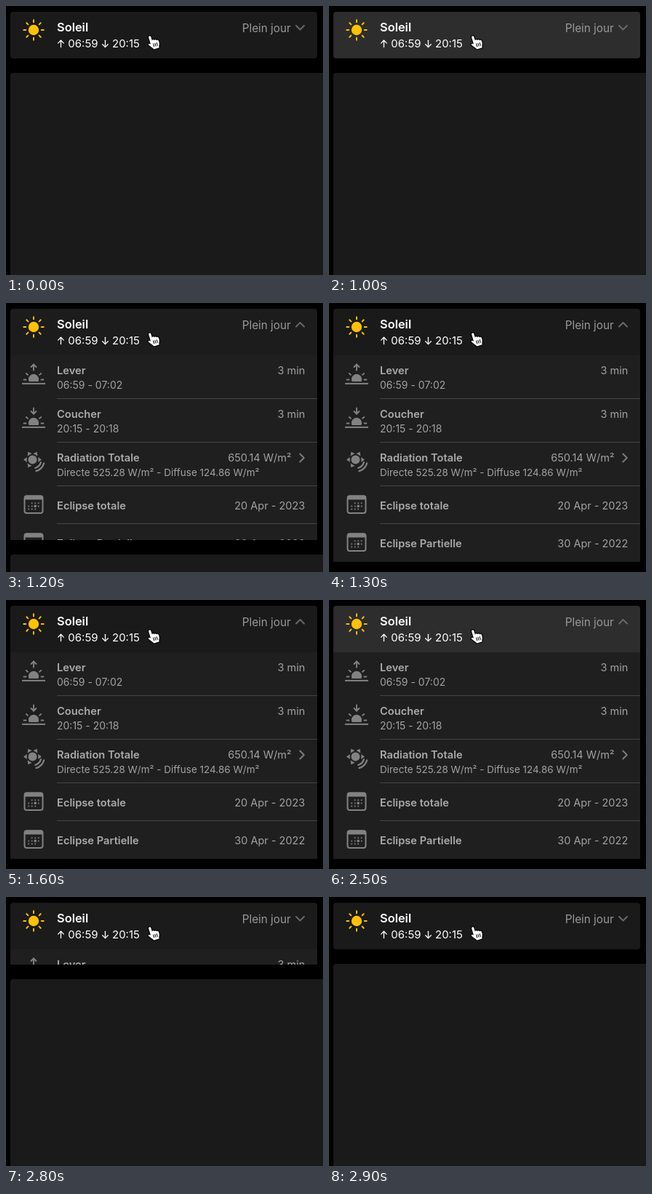
These frames come from a looping animation (436x370 px, 4000 ms). An HTML page with a canvas:

```html
<!DOCTYPE html>
<html lang="fr">
<head>
<meta charset="utf-8">
<style>
html, body { margin: 0; width: 100%; height: 100%; overflow: hidden; background: #000; }
canvas { display: block; width: 436px; height: 370px; }
</style>
</head>
<body>
<canvas id="stage"></canvas>
<script>
const W = 436, H = 370, LOOP = 4000, STEP = 100;
const HEAD = 72, OPEN = 284, GRAY = '#828284', YELLOW = '#ffc107';
const canvas = document.getElementById('stage');
const dpr = window.devicePixelRatio || 1;
canvas.width = W * dpr;
canvas.height = H * dpr;
const c = canvas.getContext('2d');

function text(s, x, y, size, weight, color, align = 'left') {
  c.font = `${weight} ${size}px Inter, "Liberation Sans", sans-serif`;
  c.textAlign = align;
  c.fillStyle = color;
  c.fillText(s, x, y);
}

function line(points, color, width, cap = 'round') {
  c.beginPath();
  points.forEach(([x, y], i) => i ? c.lineTo(x, y) : c.moveTo(x, y));
  c.strokeStyle = color;
  c.lineWidth = width;
  c.lineCap = cap;
  c.lineJoin = 'round';
  c.stroke();
}

function disc(x, y, r, color) {
  c.beginPath();
  c.arc(x, y, r, 0, Math.PI * 2);
  c.fillStyle = color;
  c.fill();
}

function box(x, y, w, h, radii, color) {
  c.beginPath();
  c.roundRect(x, y, w, h, radii);
  c.fillStyle = color;
  c.fill();
}

function ray(x, y, angle, from, to, color, width) {
  const dx = Math.cos(angle), dy = Math.sin(angle);
  line([[x + dx * from, y + dy * from], [x + dx * to, y + dy * to]], color, width);
}

function arrow(x, top, bottom, up, head, color, width) {
  const tip = up ? top : bottom, dy = up ? head : -head;
  line([[x, top], [x, bottom]], color, width);
  line([[x - head, tip + dy], [x, tip], [x + head, tip + dy]], color, width);
}

function sun(x, y) {
  disc(x, y, 7.2, YELLOW);
  for (let i = 0; i < 8; i++) ray(x, y, i * Math.PI / 4, 10.8, 13.7, YELLOW, 2);
}

function horizon(y, up) {
  arrow(38, y, y + 8, up, 3.5, GRAY, 1.9);
  c.beginPath();
  c.arc(38, y + 20.5, 7.2, Math.PI * 0.86, Math.PI * 2.14);
  c.fillStyle = GRAY;
  c.fill();
  for (const a of [-180, -140, -40, 0]) {
    ray(38, y + 21, a * Math.PI / 180, 10.5, 13.4, GRAY, 1.9);
  }
  line([[22, y + 26.4], [54, y + 26.4]], GRAY, 2, 'butt');
}

function radiation(x, y) {
  disc(x, y, 6, GRAY);
  for (const a of [0, 120, 180, 240, 300]) {
    c.save();
    c.translate(x, y);
    c.rotate(a * Math.PI / 180);
    c.beginPath();
    c.moveTo(7.8, -3.4);
    c.lineTo(12.4, 0);
    c.lineTo(7.8, 3.4);
    c.fillStyle = GRAY;
    c.fill();
    c.restore();
  }
  for (const r of [11.4, 15.8]) {
    c.beginPath();
    c.arc(x + 0.5, y + 0.5, r, 0.28, 1.29);
    c.strokeStyle = GRAY;
    c.lineWidth = 2.2;
    c.lineCap = 'round';
    c.stroke();
  }
}

function calendar(y) {
  c.beginPath();
  c.roundRect(25.5, y + 1, 25, 23.5, 3);
  c.strokeStyle = GRAY;
  c.lineWidth = 2;
  c.stroke();
  box(25, y, 26, 6, [3, 3, 0, 0], GRAY);
  for (let row = 0; row < 3; row++) {
    for (let col = 0; col < 4; col++) {
      if (row === 0 && col === 0 || row === 2 && col === 3) continue;
      disc(31.2 + col * 4.5, y + 10.7 + row * 4.2, row === 1 && col === 2 ? 1.8 : 1, GRAY);
    }
  }
}

function row(title, value, y, right = 411.3) {
  text(title, 70, y, 14.7, 600, '#aaaaaa');
  text(value, right, y, 14.5, 400, '#a2a2a2', 'right');
}

function note(s, y, size = 14) {
  text(s, 70, y, size, 400, '#a2a2a2');
}

function details(bottom) {
  c.save();
  c.beginPath();
  c.rect(6, HEAD, 422, bottom - HEAD);
  c.clip();
  box(6, HEAD, 422, OPEN, 0, '#1f1f1f');
  for (const y of [131, 191, 251, 303]) box(70, y, 358, 1, 0, '#454545');
  horizon(84.5, true);
  row('Lever', '3 min', 98);
  note('06:59 - 07:02', 118);
  horizon(144.5, false);
  row('Coucher', '3 min', 158);
  note('20:15 - 20:18', 178);
  radiation(36.5, 215.5);
  row('Radiation Totale', '650.14 W/m²', 218, 392.4);
  note('Directe 525.28 W/m² - Diffuse 124.86 W/m²', 238, 13.5);
  line([[404.3, 207.5], [409.8, 213], [404.3, 218.5]], '#7a7a7a', 2);
  calendar(264.5);
  row('Eclipse totale', '20 Apr - 2023', 284);
  calendar(316.5);
  row('Eclipse Partielle', '30 Apr - 2022', 336);
  c.restore();
}

function header(shade, expanded, closed) {
  const low = closed ? 4 : 0;
  box(6, 8, 422, 64, [4, 4, low, low], `rgb(${shade},${shade},${shade})`);
  sun(38, 33);
  text('Soleil', 70, 35, 16.4, 600, '#fff');
  arrow(75.5, 47.3, 56.6, true, 3.8, '#fff', 1.3);
  text('06:59', 85.3, 57, 15, 400, '#fff');
  arrow(136.5, 47.3, 56.6, false, 3.8, '#fff', 1.3);
  text('20:15', 146, 57, 15, 400, '#fff');
  text('Plein jour', 391.8, 36, 15.3, 400, '#999999', 'right');
  const [end, mid] = expanded ? [32.5, 27] : [27, 32.5];
  line([[399, end], [404.5, mid], [410, end]], '#686868', 2);
}

function hand() {
  c.save();
  c.translate(197.3, 41.5);
  c.rotate(-0.3);
  c.beginPath();
  c.moveTo(-1.6, 1.4);
  c.bezierCurveTo(-1.6, -0.6, 1.6, -0.6, 1.6, 1.4);
  c.lineTo(1.7, 7);
  c.bezierCurveTo(2.4, 5.6, 4.6, 6, 4.8, 7.6);
  c.bezierCurveTo(5.6, 6.4, 7.5, 7, 7.7, 8.6);
  c.bezierCurveTo(8.6, 7.8, 10.2, 8.6, 10.2, 10.4);
  c.bezierCurveTo(10.3, 13.4, 9.6, 15.2, 8.4, 16.8);
  c.lineTo(8.2, 19);
  c.lineTo(0.6, 19);
  c.bezierCurveTo(0, 16.8, -2.6, 14.8, -4.6, 11.4);
  c.bezierCurveTo(-5.4, 9.6, -3.4, 8.6, -1.6, 11);
  c.closePath();
  c.fillStyle = '#fff';
  c.strokeStyle = '#000';
  c.lineWidth = 2.4;
  c.lineJoin = 'round';
  c.stroke();
  c.fill();
  for (const x of [2, 4.4, 6.8]) line([[x, 11.6], [x, 15.6]], '#000', 1);
  c.restore();
}

// CSS "ease" curve
function ease(p) {
  if (p <= 0) return 0;
  if (p >= 1) return 1;
  let lo = 0, hi = 1, s = 0.5;
  for (let i = 0; i < 24; i++) {
    s = (lo + hi) / 2;
    const x = 0.75 * s * (1 - s) + s ** 3;
    if (x < p) lo = s; else hi = s;
  }
  return 0.3 * s * (1 - s) ** 2 + 3 * s * s * (1 - s) + s ** 3;
}

function draw(time) {
  const t = Math.floor(time / STEP) * STEP;
  const opening = t < 2500;
  const start = opening ? 1016 : 2598.6;
  const end = opening ? 1300 : 2900;
  const p = t >= end ? 1 : ease((t - start) / 300);
  const amount = opening ? p : 1 - p;
  const bottom = HEAD + Math.round(OPEN * amount);
  const pressed = t >= (opening ? 1000 : 2500);
  const shade = pressed ? Math.round(26 + 19 * (1 - p)) : 26;
  const expanded = opening ? t >= 1100 : t < 2600;

  c.setTransform(dpr, 0, 0, dpr, 0, 0);
  c.fillStyle = '#000';
  c.fillRect(0, 0, W, H);
  box(6, bottom + 20, 440, 400, 4, '#1a1a1a');
  if (bottom > HEAD) details(bottom);
  header(shade, expanded, bottom === HEAD);
  hand();
}

const begin = performance.now();
function tick() {
  draw((performance.now() - begin) % LOOP);
  requestAnimationFrame(tick);
}
tick();
</script>
</body>
</html>
```
